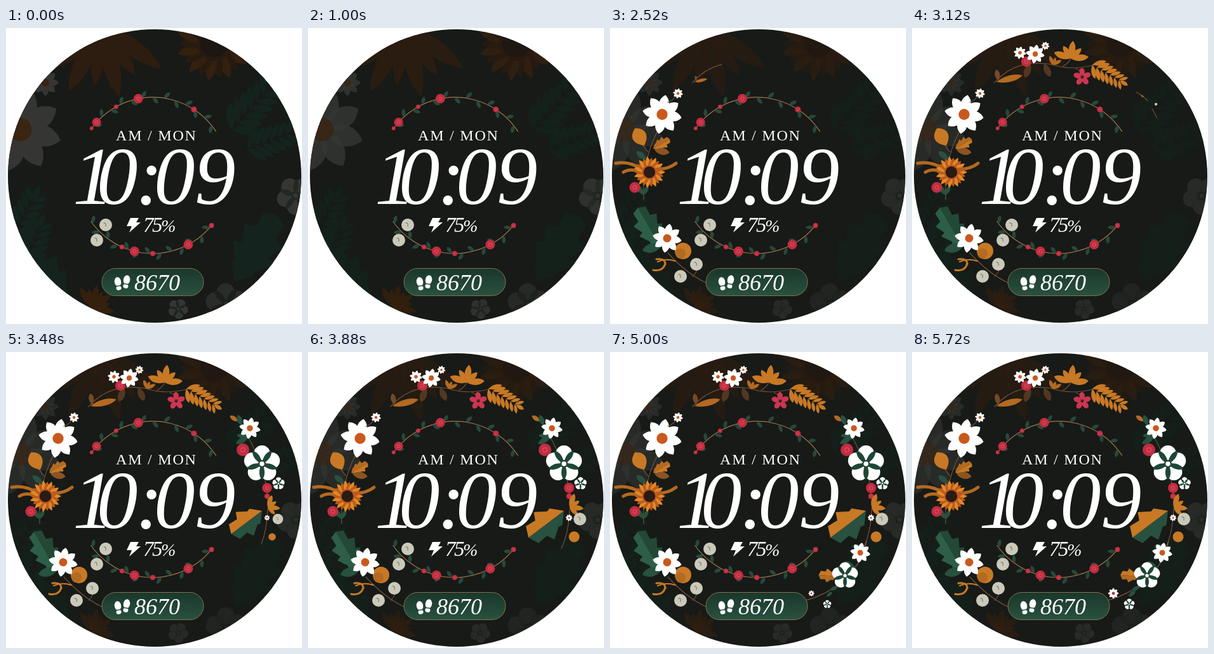
An HTML page with a canvas that plays this animation: 466 by 466 pixels, repeating every 5.76 s.

```html
<!DOCTYPE html>
<html lang="en">
<head>
<meta charset="utf-8">
<title>Floral watch face</title>
<style>
html, body { margin: 0; width: 100%; height: 100%; overflow: hidden; background: #fff; }
canvas, svg { position: absolute; left: 0; top: 0; width: 466px; height: 466px; }
text { fill: #fff; font-family: "Liberation Serif", "Noto Serif", serif; font-style: italic; }
</style>
</head>
<body>
<canvas id="face" width="466" height="466"></canvas>
<svg viewBox="0 0 466 466">
  <text x="173" y="177" font-size="24" letter-spacing="1.8" style="font-style:normal">AM / MON</text>
  <text x="105 143 204 233 297" y="277" font-size="129">10:09</text>
  <text x="216 230" y="321" font-size="33">75<tspan x="244" font-size="28">%</tspan></text>
  <text x="202" y="413" font-size="36">8670</text>
</svg>
<script>
const c = document.getElementById('face').getContext('2d');
const LOOP = 5760, TAU = Math.PI * 2, RAD = TAU / 360;
const WHITE = '#fff', ORANGE = '#c87925', RUST = '#b36a22', RED = '#c32c40',
  GREEN = '#28513f', CREAM = '#cbc9b9', BROWN = '#735039';
let time = 0, growth = null;

const clamp = v => Math.max(0, Math.min(1, v));

// Parts open clockwise: each waits until the sweep reaches its angle on the dial.
function grown(x, y) {
  if (!growth) return 1;
  const angle = Math.atan2(y - 233, x - 234) / RAD;
  const ahead = Math.max(0, (angle - growth.from + 540) % 360 - 180);
  return 1 - (1 - clamp((time - growth.start - ahead * growth.rate) / growth.span)) ** 3;
}

function group(start, from, draw, rate = 5, span = 330) {
  growth = { start, from, rate, span };
  if (time >= start) draw();
  growth = null;
}

function at(x, y, degrees, draw) {
  const s = grown(x, y), outer = growth;
  if (!s) return;
  growth = null;
  c.save();
  c.translate(x, y);
  c.rotate(degrees * RAD);
  c.scale(s, s);
  draw();
  c.restore();
  growth = outer;
}

function ring(n, draw) {
  for (let i = 0; i < n; i++) at(0, 0, i * 360 / n, () => draw(i));
}

function disc(x, y, r, color, ry = r) {
  at(x, y, 0, () => {
    c.fillStyle = color;
    c.beginPath();
    c.ellipse(0, 0, r, ry, 0, 0, TAU);
    c.fill();
  });
}

function poly(points, color) {
  c.fillStyle = color;
  c.beginPath();
  points.forEach(([x, y]) => c.lineTo(x, y));
  c.fill();
}

function petal(len, w, color) {
  c.fillStyle = color;
  c.beginPath();
  c.moveTo(0, 0);
  c.bezierCurveTo(len * .35, -w, len * .75, -w, len, 0);
  c.bezierCurveTo(len * .75, w, len * .35, w, 0, 0);
  c.fill();
}

const leaf = (x, y, len, degrees, color = GREEN, w = .3) =>
  at(x, y, degrees, () => petal(len, len * w, color));

function daisy(x, y, r, turn = 10, color = WHITE, core = '#c9581c') {
  at(x, y, turn, () => {
    ring(8, () => petal(r, r * .34, color));
    disc(0, 0, r * .28, core);
  });
}

function sunflower(x, y, r, light, dark, core) {
  at(x, y, 0, () => {
    ring(22, i => petal(r * (i % 2 ? .92 : 1), r * .19, i % 2 ? dark : light));
    disc(0, 0, r * .46, dark);
    disc(0, 0, r * .37, core);
  });
}

function pinwheel(x, y, r, turn = 54, color = WHITE, sepal = '#1e4735') {
  at(x, y, turn, () => {
    ring(5, () => disc(r * .6, 0, r * .4, color, r * .43));
    c.rotate(TAU / 10);
    ring(5, () => petal(r * .88, r * .19, sepal));
    disc(0, 0, r * .13, color);
  });
}

function berry(x, y, r) {
  at(x, y, 0, () => {
    disc(0, 0, r, RED);
    disc(0, 0, r * .4, '#d3525f');
    disc(0, 0, r * .26, RED);
  });
}

function pearl(x, y) {
  at(x, y, 0, () => {
    disc(0, 0, 10, CREAM);
    stem(-3, -3, 1, -4, 0, 2, '#777c69');
  });
}

function stem(x, y, cx, cy, ex, ey, color = BROWN, width = 1.2) {
  const g = grown(x, y);
  if (!g) return;
  const len = Math.hypot(cx - x, cy - y) + Math.hypot(ex - cx, ey - cy);
  c.strokeStyle = color;
  c.lineWidth = width;
  c.lineCap = 'round';
  c.setLineDash([len * g, 999]);
  c.beginPath();
  c.moveTo(x, y);
  c.quadraticCurveTo(cx, cy, ex, ey);
  c.stroke();
  c.setLineDash([]);
}

// Leaf with toothed edges, each half in its own colour.
function toothed(x, y, len, degrees, w, upper, lower = upper, teeth = 4) {
  at(x, y, degrees, () => {
    for (const side of [-1, 1]) {
      const edge = [[0, 0]];
      for (let i = 1; i < teeth * 2; i++) {
        const u = i / teeth / 2, tip = i % 2;
        edge.push([len * (u + (tip ? .06 : -.02)),
          side * w * Math.sin(Math.PI * u) ** .7 * (tip ? 1 : .62)]);
      }
      poly([...edge, [len, 0]], side < 0 ? upper : lower);
    }
  });
}

// Leaf pairs that shrink along a shared stalk.
function frond(x, y, len, degrees, color, pairs = 7) {
  at(x, y, degrees, () => {
    for (let i = 0; i < pairs; i++) {
      const u = i / pairs, blade = len * (.4 - u * .15);
      leaf(len * u, 0, blade, -45, color, .22);
      leaf(len * u, 0, blade, 50, color, .22);
    }
    leaf(len * .9, 0, len * .25, 0, color);
  });
}

function fan(x, y, len, from, to, n, color, w = .25) {
  for (let i = 0; i < n; i++) {
    leaf(x, y, len * (i % 2 ? .82 : 1), from + (to - from) * i / (n - 1), color, w);
  }
}

function backdrop() {
  const moss = '#14231d', bark = '#2d1c10', ash = '#353633', seed = '#3a2412';
  c.globalAlpha = 1 - .42 * clamp(time / 2400);
  frond(2, 345, 95, -62, moss);
  frond(25, 390, 90, -70, moss);
  frond(355, 160, 105, -48, moss);
  frond(380, 190, 90, -20, moss);
  toothed(360, 400, 125, -58, 38, moss);
  toothed(95, 440, 110, -125, 36, moss);
  toothed(400, 410, 90, -35, 30, moss);
  leaf(15, 110, 60, -55, moss);
  fan(150, -5, 117, 36, 156, 7, bark, .15);
  sunflower(328, 24, 60, '#33200f', '#291a10', '#1c1713');
  daisy(22, 160, 66, 15, ash, seed);
  daisy(62, 86, 21, 0, ash, seed);
  pinwheel(456, 264, 30, 20, ash, '#222822');
  pinwheel(347, 435, 33, 50, '#2a2c2a', '#1a211d');
  pinwheel(271, 442, 16, 10, ash, '#1d2520');
  fan(135, 440, 36, -120, 10, 7, '#35200e', .2);
  c.globalAlpha = 1;
}

// Berries are given as angle and radius on a circular vine.
function vine(cy, from, to, berries) {
  const R = 119, cx = 231;
  c.strokeStyle = '#a4754a';
  c.lineWidth = 1.2;
  c.beginPath();
  c.arc(cx, cy, R, from * RAD, to * RAD);
  c.stroke();
  const spot = (deg, draw) => draw(cx + R * Math.cos(deg * RAD), cy + R * Math.sin(deg * RAD));
  for (let deg = from + 4, i = 0; deg <= to; deg += 8.5, i++) {
    spot(deg, (x, y) => leaf(x, y, 13, deg + (i % 2 ? 40 : 140), '#27483a'));
  }
  for (const [deg, r] of berries) spot(deg, (x, y) => berry(x, y, r));
}

function innerWreath() {
  vine(228, 215, 327, [[216, 3], [222, 7], [241, 3.5], [259, 7.5], [303, 4.5]]);
  vine(236, 37, 145, [[39, 4], [62, 7.5], [90, 4], [104, 7.5], [114, 3.8]]);
  pearl(157, 310);
  pearl(143, 334);
}

function lowerLeft() {
  stem(151, 401, 121, 387, 91, 354);
  stem(130, 391, 139, 384, 136, 372);
  stem(103, 367, 88, 362, 75, 368, ORANGE, 2);
  stem(73, 364, 87, 362, 87, 372, ORANGE, 3);
  stem(68, 381, 83, 384, 87, 371, ORANGE, 3);
  pearl(111, 391);
  pearl(136, 372);
  disc(115, 351, 13, ORANGE);
  disc(111, 355, 8, RUST);
  toothed(80, 345, 72, -120, 22, '#2d5e48', '#234936');
  leaf(82, 342, 32, 165);
  daisy(90, 331, 23);
}

function left() {
  stem(53, 270, 50, 200, 82, 150);
  stem(60, 195, 51, 185, 45, 173);
  stem(54, 235, 45, 248, 39, 251);
  fan(53, 263, 20, -125, -65, 2, GREEN);
  leaf(57, 207, 20, 220);
  berry(39, 251, 8.5);
  stem(50, 222, 30, 209, 9, 213, RUST, 5);
  stem(49, 227, 32, 220, 21, 227, RUST, 5);
  stem(68, 222, 90, 224, 104, 213, RUST, 5);
  sunflower(62, 227, 25, '#e18a25', '#bd5920', '#2a1c14');
  leaf(54, 185, 31, -118, ORANGE, .48);
  toothed(68, 190, 30, -30, 10, RUST, ORANGE);
  leaf(70, 192, 24, 10, '#8b5422');
  daisy(82, 136, 31);
  stem(91, 117, 100, 114, 106, 104);
  daisy(107, 103, 8);
}

function crown() {
  stem(130, 86, 163, 48, 218, 57);
  stem(218, 57, 250, 68, 287, 58);
  leaf(136, 83, 18, -100, '#744a25');
  leaf(133, 85, 42, -14, RUST, .16);
  leaf(186, 56, 24, 110, '#533720');
  leaf(208, 56, 23, 65, '#533720');
  berry(180, 53, 8);
  daisy(170, 39, 10);
  daisy(194, 41, 15);
  daisy(210, 28, 6.5);
  fan(222, 58, 15, -110, -30, 3, RUST);
  stem(238, 60, 247, 55, 250, 48);
  fan(250, 48, 28, -160, -5, 5, ORANGE);
  stem(258, 64, 267, 66, 268, 77);
  at(268, 77, -20, () => ring(5, () => disc(8, 0, 6, '#cd3551', 4.3)));
  frond(284, 58, 56, 30, ORANGE);
}

function right() {
  stem(353, 101, 371, 110, 378, 127);
  stem(378, 127, 420, 205, 411, 258);
  stem(411, 258, 410, 285, 399, 309);
  leaf(365, 109, 15, -145, RUST);
  leaf(371, 116, 18, -110);
  fan(382, 133, 23, 150, 185, 2, GREEN);
  daisy(384, 120, 17);
  berry(373, 154, 10);
  pinwheel(403, 176, 29);
  pinwheel(429, 207, 10);
  berry(411, 214, 8);
  berry(411, 227, 4.5);
  fan(412, 244, 22, -70, 45, 4, ORANGE);
  toothed(403, 250, 70, 143, 27, GREEN, ORANGE, 3);
  pearl(428, 263);
  daisy(411, 261, 5.5);
  disc(419, 291, 8.5, ORANGE);
}

function lowerRight() {
  stem(404, 298, 398, 326, 382, 344);
  stem(382, 344, 351, 381, 304, 392);
  leaf(400, 309, 19, 190);
  daisy(394, 316, 16);
  fan(386, 340, 20, -150, -250, 2, GREEN);
  toothed(358, 353, 30, 184, 11, RUST, ORANGE, 3);
  pinwheel(370, 352, 21);
  leaf(359, 369, 14, 155);
  leaf(341, 385, 14, -40);
  pinwheel(342, 397, 8.5);
  daisy(317, 380, 8.5, 0, WHITE, RED);
}

function controls() {
  const shade = c.createLinearGradient(0, 379, 0, 421);
  shade.addColorStop(0, '#1a372c');
  shade.addColorStop(1, '#29513f');
  c.fillStyle = shade;
  c.strokeStyle = '#85734f';
  c.lineWidth = 1;
  c.beginPath();
  c.roundRect(151, 378.5, 160, 43, 21.5);
  c.fill();
  c.stroke();
  poly([[196, 299], [209, 299], [205, 306], [212, 306], [194, 322], [198, 312], [190, 312]], WHITE);
  for (const side of [-1, 1]) {
    at(183 + side * 7, 398 - side * 1.5, side * 9, () => {
      disc(0, 0, 5.2, WHITE, 7.4);
      disc(0, 10, 4, WHITE, 3.5);
      c.fillStyle = '#234838';
      c.fillRect(-6, 6, 12, 1.3);
    });
  }
}

function frame(now) {
  time = now % LOOP;
  c.clearRect(0, 0, 466, 466);
  c.save();
  c.beginPath();
  c.arc(234, 233, 231, 0, TAU);
  c.clip();
  c.fillStyle = '#171a17';
  c.fillRect(0, 0, 466, 466);
  backdrop();
  innerWreath();
  group(1140, 116, lowerLeft);
  group(1820, 168, left);
  group(2450, 235, crown);
  group(3050, 312, right);
  group(4100, 21, lowerRight, 19, 600);
  controls();
  c.restore();
  requestAnimationFrame(frame);
}
requestAnimationFrame(frame);
</script>
</body>
</html>
```
